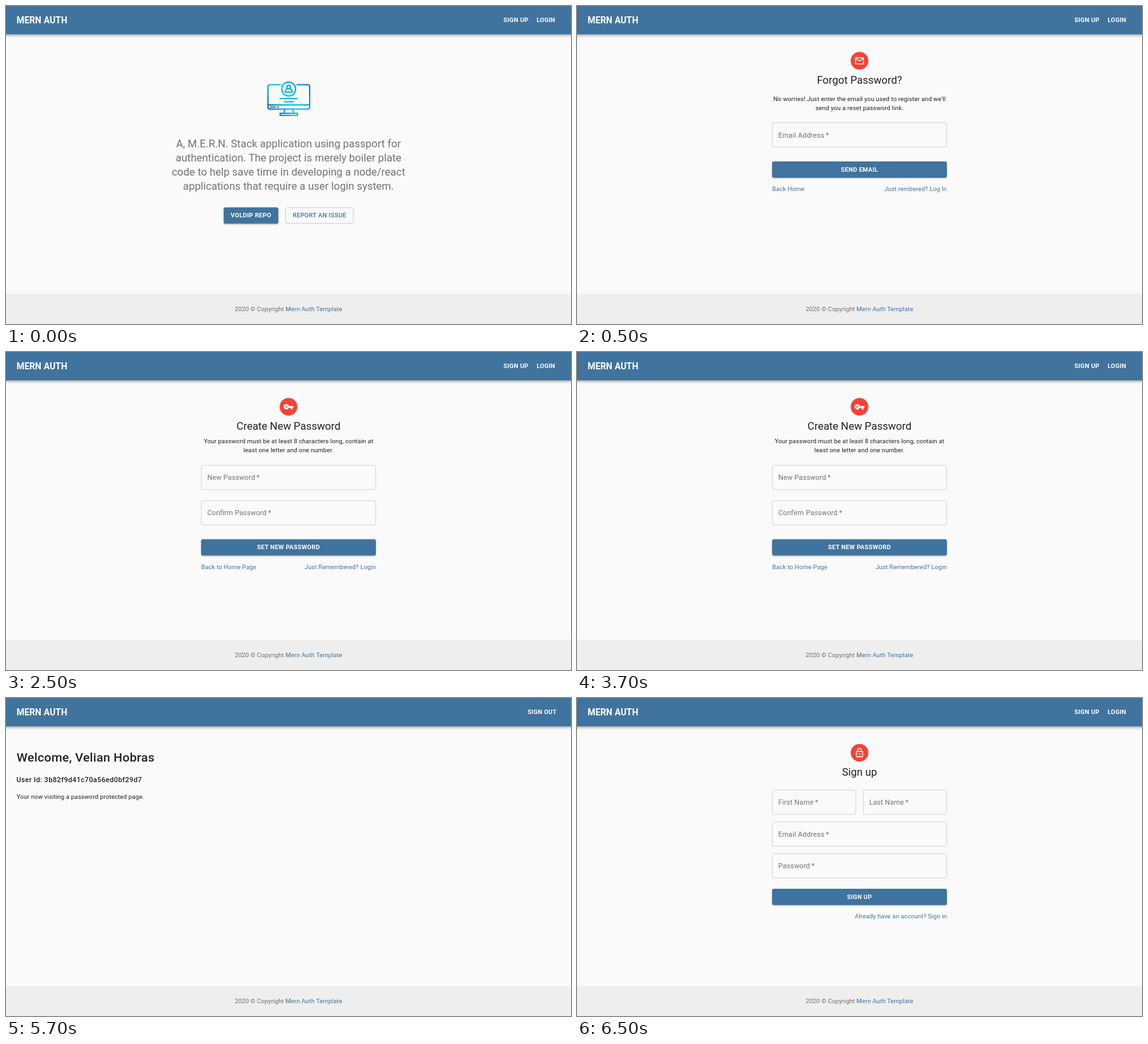
Recreate the animation shown at these times as an HTML page. Size 880x495 px, loop 8000 ms.

```html
<!DOCTYPE html>
<html lang="en">
<head>
<meta charset="utf-8">
<title>Mern Auth</title>
<style>
  html, body { margin: 0; width: 100%; height: 100%; overflow: hidden; background: #fafafa; }
  svg { display: block; width: 880px; height: 495px; }
  text { font: 14px Roboto, sans-serif; letter-spacing: .15px; fill: rgba(0,0,0,.87); white-space: pre; }
  .title { font-size: 24px; letter-spacing: 0; }
  .brand { font-size: 20px; font-weight: 700; fill: #fff; }
  .label { font-size: 16px; }
  .muted { fill: rgba(0,0,0,.54); }
  .btn { font-weight: 700; letter-spacing: .4px; fill: #fff; }
  .ghost { font-weight: 500; letter-spacing: .4px; }
  .link, .ghost { fill: #40739e; }
  .hello { font-size: 28px; font-weight: 500; letter-spacing: .35px; }
  .userid { font-size: 16px; font-weight: 500; letter-spacing: .5px; }
  .mid { text-anchor: middle; }
  .end { text-anchor: end; }
  .fill { fill: #40739e; }
  .field { fill: none; stroke: rgba(0,0,0,.23); }
  .outline { fill: none; stroke: rgba(64,115,158,.45); }
  .icon { fill: none; stroke: #fff; stroke-width: 2; }
  .art { fill: none; stroke: url(#sea); stroke-width: 2; stroke-linejoin: round; }
</style>
</head>
<body>
<svg viewBox="0 0 1280 720">
  <defs>
    <filter id="bar" filterUnits="userSpaceOnUse" x="-60" y="-60" width="1400" height="180" color-interpolation-filters="sRGB">
      <feDropShadow dx="0" dy="1" stdDeviation="2" flood-opacity=".2"/>
      <feDropShadow dx="0" dy="4" stdDeviation="2.5" flood-opacity=".14"/>
      <feDropShadow dx="0" dy="1" stdDeviation="5" flood-opacity=".12"/>
    </filter>
    <filter id="raise" x="-20%" y="-50%" width="140%" height="200%" color-interpolation-filters="sRGB">
      <feDropShadow dx="0" dy="1" stdDeviation=".5" flood-opacity=".2"/>
      <feDropShadow dx="0" dy="2" stdDeviation="1" flood-opacity=".14"/>
      <feDropShadow dx="0" dy="1" stdDeviation="2.5" flood-opacity=".12"/>
    </filter>
    <linearGradient id="sea" gradientUnits="userSpaceOnUse" x1="412" y1="168" x2="470" y2="118">
      <stop offset="0" stop-color="#0a649c"/>
      <stop offset=".4" stop-color="#0cc4d8"/>
      <stop offset=".6" stop-color="#10b4e0"/>
      <stop offset="1" stop-color="#1468e0"/>
    </linearGradient>
  </defs>
  <rect class="fill" x="-40" y="-40" width="1360" height="104" filter="url(#bar)"/>
  <text class="brand" x="24" y="39">MERN AUTH</text>
  <rect y="652" width="1280" height="68" fill="#eee"/>
  <text class="muted mid" x="640" y="690.8">2020 © Copyright <tspan class="link">Mern Auth Template</tspan></text>
  <g id="pages"></g>
</svg>
<script>
const LEFT = 442, RIGHT = 838, WIDTH = RIGHT - LEFT, CENTER = 640;

const text = (s, x, y, cls = '') => `<text class="${cls}" x="${x}" y="${y}">${s}</text>`;
const centered = (lines, y, step, cls = '') =>
  lines.map((s, i) => text(s, CENTER, y + i * step, cls + ' mid')).join('');
const box = (x, y, w, h, cls, extra = '') =>
  `<rect class="${cls}" x="${x}" y="${y}" width="${w}" height="${h}" rx="4" ${extra}/>`;
const field = (label, y, x = LEFT, w = WIDTH) =>
  box(x + .5, y + .5, w - 1, 55, 'field') + text(label + '\u2009*', x + 14, y + 33.5, 'label muted');
const button = (label, y, x = LEFT, w = WIDTH) =>
  box(x, y, w, 36.5, 'fill', 'filter="url(#raise)"') + text(label, x + w / 2, y + 23, 'btn mid');
const links = (y, right, left = '') => text(left, LEFT, y, 'link') + text(right, RIGHT, y, 'link end');
const heading = (icon, s) =>
  `<circle cx="640" cy="124" r="20" fill="#f44336"/>
   <g class="icon" transform="translate(628 112)">${icon}</g>` + centered([s], 176, 0, 'title');

const guestNav = text('SIGN UP', 1127, 36.5, 'btn') + text('LOGIN', 1202, 36.5, 'btn');

const mail = '<rect x="3" y="5" width="18" height="14" rx="1"/><path d="M3 6.8l9 5.6 9-5.6"/>';
const key = '<g stroke-width="4"><circle cx="7" cy="12" r="4"/><path d="M11 12H23M19 12v6"/></g>';
const lock = `<rect x="5" y="9" width="14" height="12" rx="1"/><path d="M8 9V6a4 4 0 0 1 8 0v3"/>
  <circle cx="12" cy="15" r="1"/>`;

const monitor = `<g class="art" transform="scale(${16 / 11})">
  <path d="M428 122.5H411.5q-3.5 0-3.5 3.5v31q0 3.5 3.5 3.5h58q3.5 0 3.5-3.5v-31q0-3.5-3.5-3.5H452.500"/>
  <path d="M408 154.01L473 154M411 157.3l9 .01M422 157.3l3 .01M426 144l28 .01M433 149l15 .01"/>
  <path d="M434.500 160.500l-2 6.500M446.500 160.500l2 6.500M427 167h27v3.300h-27z"/>
  <circle cx="440.300" cy="129.300" r="10.800"/>
  <circle cx="440.300" cy="126" r="2.700"/>
  <path d="M435 134v-1.500q0-3 3-3.500h4.600q3 .5 3 3.500v1.500z"/>
</g>`.replace(/(\.\d)00/g, '$1');

const home = guestNav + monitor + centered([
    'A, M.E.R.N. Stack application using passport for',
    'authentication. The project is merely boiler plate',
    'code to help save time in developing a node/react',
    'applications that require a user login system.'
  ], 320, 32, 'title muted')
  + button('VOLDIP REPO', 456, 493, 124)
  + box(633.5, 456.5, 153.500, 35.5, 'outline') + text('REPORT AN ISSUE', 710.3, 479, 'ghost mid');

const forgot = guestNav + heading(mail, 'Forgot Password?')
  + centered(["No worries! Just enter the email you used to register and we'll",
    'send you a reset password link.'], 215, 20)
  + field('Email Address', 264) + button('SEND EMAIL', 352)
  + links(419, 'Just rembered? Log In', 'Back Home');

const reset = guestNav + heading(key, 'Create New Password')
  + centered(['Your password must be at least 8 characters long, contain at',
    'least one letter and one number.'], 207, 20)
  + field('New Password', 256) + field('Confirm Password', 336) + button('SET NEW PASSWORD', 424)
  + links(491, 'Just Remembered? Login', 'Back to Home Page');

const welcome = text('SIGN OUT', 1181.3, 36.5, 'btn')
  + text('Welcome, Velian Hobras', 24, 144, 'hello')
  + text('User Id: 3b82f9d41c70a56ed0bf29d7', 23.5, 190.5, 'userid')
  + text('Your now visiting a password protected page.', 24, 228.5);

const signup = guestNav + heading(lock, 'Sign up')
  + field('First Name', 208, LEFT, 190) + field('Last Name', 208, 648, 190)
  + field('Email Address', 280) + field('Password', 352) + button('SIGN UP', 432)
  + links(499, 'Already have an account? Sign in');

// Page and the time in ms at which it appears
const show = [[home, 0], [forgot, 500], [reset, 2500], [welcome, 4500], [signup, 6500]];
const LOOP = 8000;
const pages = document.getElementById('pages');
const start = performance.now();
let current;

function draw() {
  const t = (performance.now() - start) % LOOP;
  const page = show.findLast(([, from]) => t >= from)[0];
  if (page !== current) pages.innerHTML = current = page;
  requestAnimationFrame(draw);
}
draw();
</script>
</body>
</html>
```
